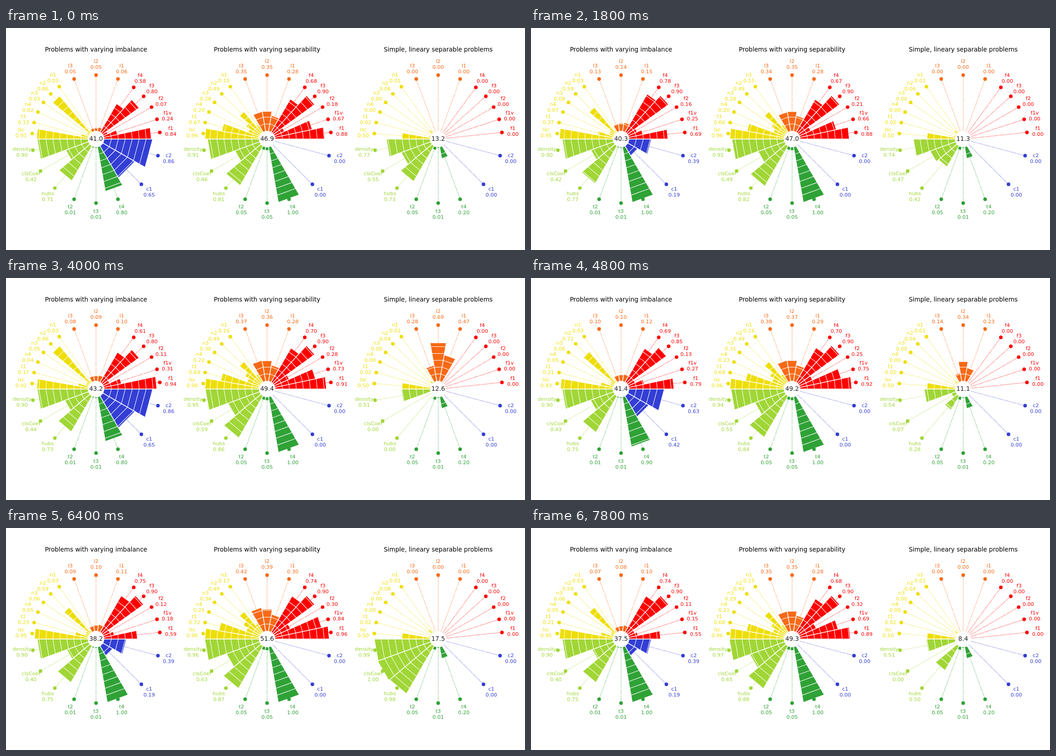
These frames come from a looping animation (1143x490 px, 8000 ms). An HTML page with a canvas:

```html
<!DOCTYPE html>
<html lang="en">
<head>
<meta charset="utf-8">
<title>Problem complexity</title>
<style>
html, body { margin: 0; width: 100%; height: 100%; overflow: hidden; background: #fff; }
canvas { display: block; }
</style>
</head>
<body>
<canvas id="stage" width="1143" height="490"></canvas>
<script>
const ctx = document.getElementById('stage').getContext('2d');

const STEP_MS = 200, STEPS = 40;
const KEY_STEPS = [0, 4, 14, 20, 28, 32, 39];
const CENTER_Y = 245.2, OUTER = 141.2, HOLE = OUTER * 0.15 / 1.15, LABEL_R = 165.5;
const RINGS = 8;

// Every group fills 60 degrees, shared equally by its measures.
const GROUPS = [
  ['#FD0100', ['f1', 'f1v', 'f2', 'f3', 'f4']],
  ['#F76915', ['l1', 'l2', 'l3']],
  ['#EEDE04', ['n1', 'n2', 'n3', 'n4', 't1', 'lsc']],
  ['#A0D636', ['density', 'clsCoef', 'hubs']],
  ['#2FA236', ['t2', 't3', 't4']],
  ['#333ED4', ['c1', 'c2']],
];
const MEASURES = GROUPS.flatMap(([color, names], g) => names.map((name, i) => {
  const width = 60 / names.length, from = g * 60 + i * width;
  return { name, color, from, mid: from + width / 2, to: from + width };
}));

// A few drivers move each panel. A measure is its base level plus its
// response to each driver; measures left out stay at zero.
const PANELS = [
  {
    title: 'Problems with varying imbalance', x: 198.3,
    drivers: [[1, 0, 0, 1, 0, 0, 0], [.2, 1, 0, .5, .4, .2, .1]],
    measures: {
      f1: [.52, .25, .33], f1v: [.13, .06, .24], f2: [.1, -.05, .12], f3: [.9, -.1], f4: [.73, -.17, .1],
      l1: [.09, -.05, .12], l2: [.07, -.05, .13], l3: [.06, -.04, .13],
      n1: [.03], n2: [.59, .27], n3: [.05, -.03, .06], n4: [.04, -.03, .06], t1: [.2, -.1, .14], lsc: [.95, -.04],
      density: [.9], clsCoef: [.39, .02, .06], hubs: [.74, -.04, .06],
      t2: [.01], t3: [.01], t4: [1, -.2], c1: [.19, .46], c2: [.39, .47],
    },
  },
  {
    title: 'Problems with varying separability', x: 575,
    drivers: [[.53, 0, 1, .64, .69, .84, .56], [.2, .7, 0, .75, .45, .9, 1]],
    measures: {
      f1: [.75, .25], f1v: [.38, .55], f2: [.15, 0, .17], f3: [.9], f4: [.57, .2],
      l1: [.24, .07], l2: [.28, .13], l3: [.22, .24],
      n1: [.12, .06], n2: [.49], n3: [.18, .19], n4: [.12, .16], t1: [.58, .17], lsc: [.96],
      density: [.9, 0, .07], clsCoef: [.41, 0, .24], hubs: [.79, 0, .09],
      t2: [.05], t3: [.05], t4: [1],
    },
  },
  {
    title: 'Simple, lineary separable problems', x: 951.8,
    drivers: [[.55, 0, .95, 0, .14, 1, 0], [.74, 0, .86, 0, .57, 1, .51], [0, 0, 0, 1, 0, 0, 0]],
    measures: {
      l1: [0, 0, 0, .47], l2: [0, 0, 0, .69], l3: [0, 0, 0, .28],
      n1: [.01], n2: [.04, .04], t1: [.02], lsc: [.5],
      density: [.51, .48], clsCoef: [0, 1], hubs: [0, 0, .98],
      t2: [.05], t3: [.01], t4: [.2],
    },
  },
];

function along(curve, step) {
  const next = Math.max(1, KEY_STEPS.findIndex(key => key >= step));
  const start = KEY_STEPS[next - 1];
  const part = (step - start) / (KEY_STEPS[next] - start);
  return curve[next - 1] + (curve[next] - curve[next - 1]) * part;
}

function measure([base, ...responses], levels) {
  const value = responses.reduce((sum, response, i) => sum + response * levels[i], base);
  return Math.min(1, Math.max(0, value));
}

const radius = value => HOLE + (OUTER - HOLE) * value;

function trace(...points) {
  ctx.beginPath();
  points.forEach(p => ctx.lineTo(...p));
}

function line(a, b, color, width) {
  trace(a, b);
  ctx.strokeStyle = color;
  ctx.lineWidth = width;
  ctx.stroke();
}

function text(content, x, baseline, size, color) {
  ctx.font = `${size}px "DejaVu Sans", sans-serif`;
  ctx.fillStyle = color;
  ctx.fillText(content, x, Math.round(baseline));
}

function drawPanel({ title, x, drivers, measures }, step) {
  const at = (r, degrees) => {
    const a = degrees * Math.PI / 180;
    return [x + r * Math.cos(a), CENTER_Y - r * Math.sin(a)];
  };
  const levels = drivers.map(curve => along(curve, step));
  const bars = MEASURES.map(m => ({ ...m, value: measure(measures[m.name] ?? [0], levels) }));

  for (const { color, from, mid, to, value } of bars) {
    ctx.globalAlpha = 0.3;
    line(at(HOLE - 1, mid), at(OUTER, mid), color, 1.7);
    ctx.globalAlpha = 1;
    const end = radius(value);
    trace(at(HOLE, from), at(end, from), at(end, to), at(HOLE, to));
    ctx.fillStyle = color;
    ctx.fill();
  }

  for (const { from, to } of bars) {
    for (let ring = 1; ring < RINGS; ring++) {
      const r = radius(ring / RINGS);
      line(at(r, from), at(r, to), '#fff', 1.13);
    }
    line(at(HOLE - 2, from), at(OUTER + 1, from), '#fff', 1.7);
  }

  for (const { name, color, mid, value } of bars) {
    ctx.beginPath();
    ctx.arc(...at(OUTER, mid), 3.95, 0, 2 * Math.PI);
    ctx.fillStyle = color;
    ctx.fill();
    const [labelX, labelY] = at(LABEL_R, mid);
    text(name, labelX, labelY - 3, 11.3, color);
    text(value.toFixed(2), labelX, labelY + 10, 11.3, color);
  }

  const score = 100 * bars.reduce((sum, bar) => sum + bar.value, 0) / bars.length;
  text(score.toFixed(1), x, 249, 13.56, '#222');
  text(title, x, 52, 13.56, '#000');
}

const startTime = performance.now();

function draw() {
  const step = Math.floor((performance.now() - startTime) / STEP_MS) % STEPS;
  ctx.fillStyle = '#fff';
  ctx.fillRect(0, 0, 1143, 490);
  ctx.textAlign = 'center';
  PANELS.forEach(panel => drawPanel(panel, step));
  requestAnimationFrame(draw);
}
draw();
</script>
</body>
</html>
```
